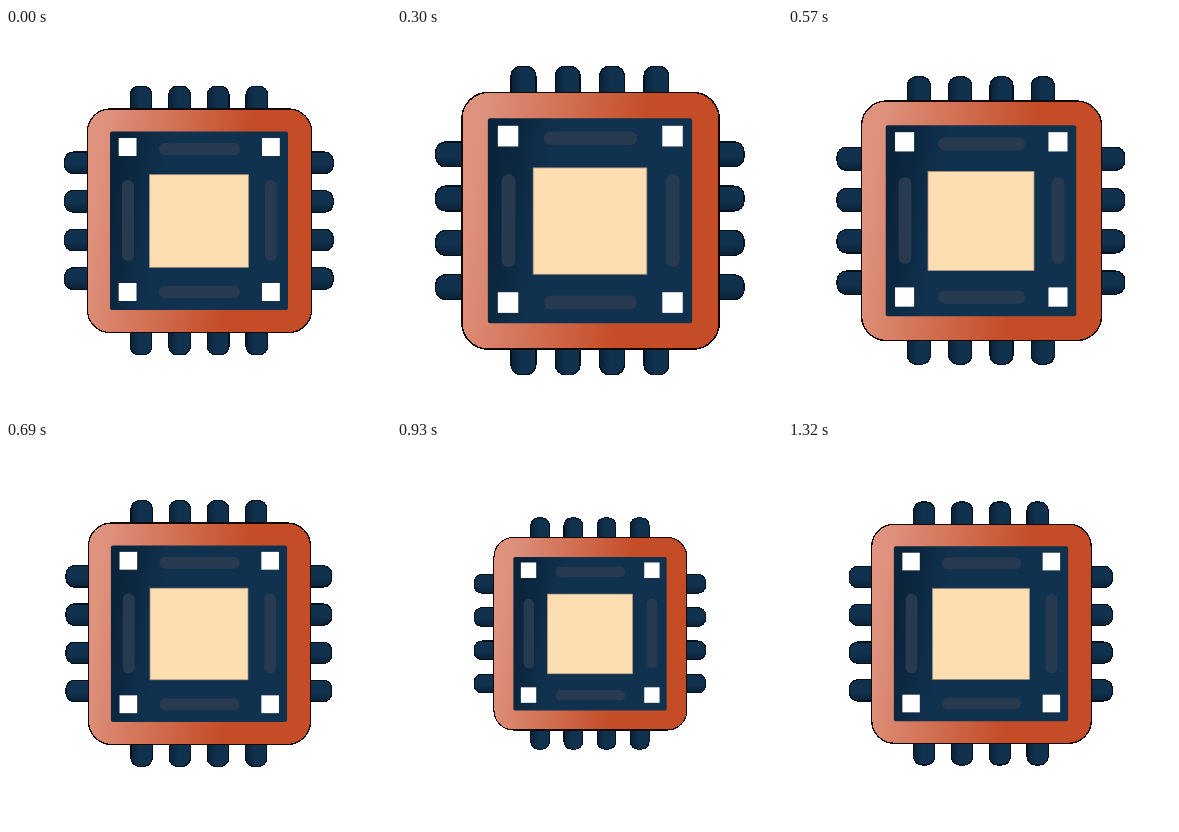
An HTML page that plays this animation: 385x385 px, repeating every 1.35 s.

```html
<!DOCTYPE html>
<html lang="en">
<head>
<meta charset="utf-8">
<title>Pulsing chip</title>
<style>
  @property --phase { syntax: "<angle>"; inherits: false; initial-value: 0deg; }
  html, body { margin: 0; width: 100%; height: 100%; overflow: hidden; background: #fff; }
  svg { display: block; width: 100%; height: 100%; }
  .chip {
    transform-origin: 193px 192.6px;
    transform: scale(calc(1 + .15 * sin(var(--phase))));
    /* tiny lead keeps step edges clear of rounding */
    animation: pulse 1350ms steps(45) -1ms infinite;
  }
  @keyframes pulse { from { --phase: 0deg; } to { --phase: 360deg; } }
  .pins { fill: url(#pin); stroke: #04101c; stroke-width: 1.2; shape-rendering: crispEdges; }
  .body { fill: url(#copper); stroke: #140805; stroke-width: 1.3; shape-rendering: crispEdges; }
  .bars { fill: #283a50; }
  .pads { fill: #fff; }
  .core { fill: #fddeb2; stroke: #a8977f; stroke-width: .7; }
</style>
</head>
<body>
<svg viewBox="0 0 385 385">
  <defs>
    <linearGradient id="copper" gradientUnits="userSpaceOnUse" x1="84" y1="185" x2="228" y2="206">
      <stop offset="0" stop-color="#df937f"/>
      <stop offset="1" stop-color="#c44d28"/>
    </linearGradient>
    <linearGradient id="navy" gradientUnits="userSpaceOnUse" x1="106" y1="190" x2="154" y2="197">
      <stop offset="0" stop-color="#0a243b"/>
      <stop offset="1" stop-color="#11324f"/>
    </linearGradient>
    <linearGradient id="pin">
      <stop offset="0" stop-color="#0a2238"/>
      <stop offset=".45" stop-color="#11324f"/>
    </linearGradient>
    <g id="row">
      <rect x="124.2" y="58.2" width="21.6" height="268.6" rx="8.5"/>
      <rect x="162.8" y="58.2" width="21.6" height="268.6" rx="8.5"/>
      <rect x="201.4" y="58.2" width="21.6" height="268.6" rx="8.5"/>
      <rect x="240" y="58.2" width="21.6" height="268.6" rx="8.5"/>
    </g>
    <g id="pair">
      <rect x="153" y="115" width="81" height="12" rx="6"/>
      <rect x="153" y="258" width="81" height="12" rx="6"/>
    </g>
  </defs>
  <g class="chip">
    <g class="pins">
      <use href="#row"/>
      <use href="#row" transform="rotate(-90 193 192.6)"/>
    </g>
    <rect class="body" x="81.4" y="80.9" width="224.2" height="223.7" rx="23"/>
    <rect x="104" y="103.5" width="178" height="178.5" rx="2" fill="url(#navy)"/>
    <g class="bars">
      <use href="#pair"/>
      <use href="#pair" transform="rotate(90 193.5 192.5)"/>
    </g>
    <g class="pads">
      <rect x="112.7" y="110" width="17.8" height="18"/>
      <rect x="256" y="110" width="17.8" height="18"/>
      <rect x="112.7" y="255" width="17.8" height="18"/>
      <rect x="256" y="255" width="17.8" height="18"/>
    </g>
    <rect class="core" x="143.5" y="146.7" width="99" height="92.6"/>
  </g>
</svg>
</body>
</html>
```
